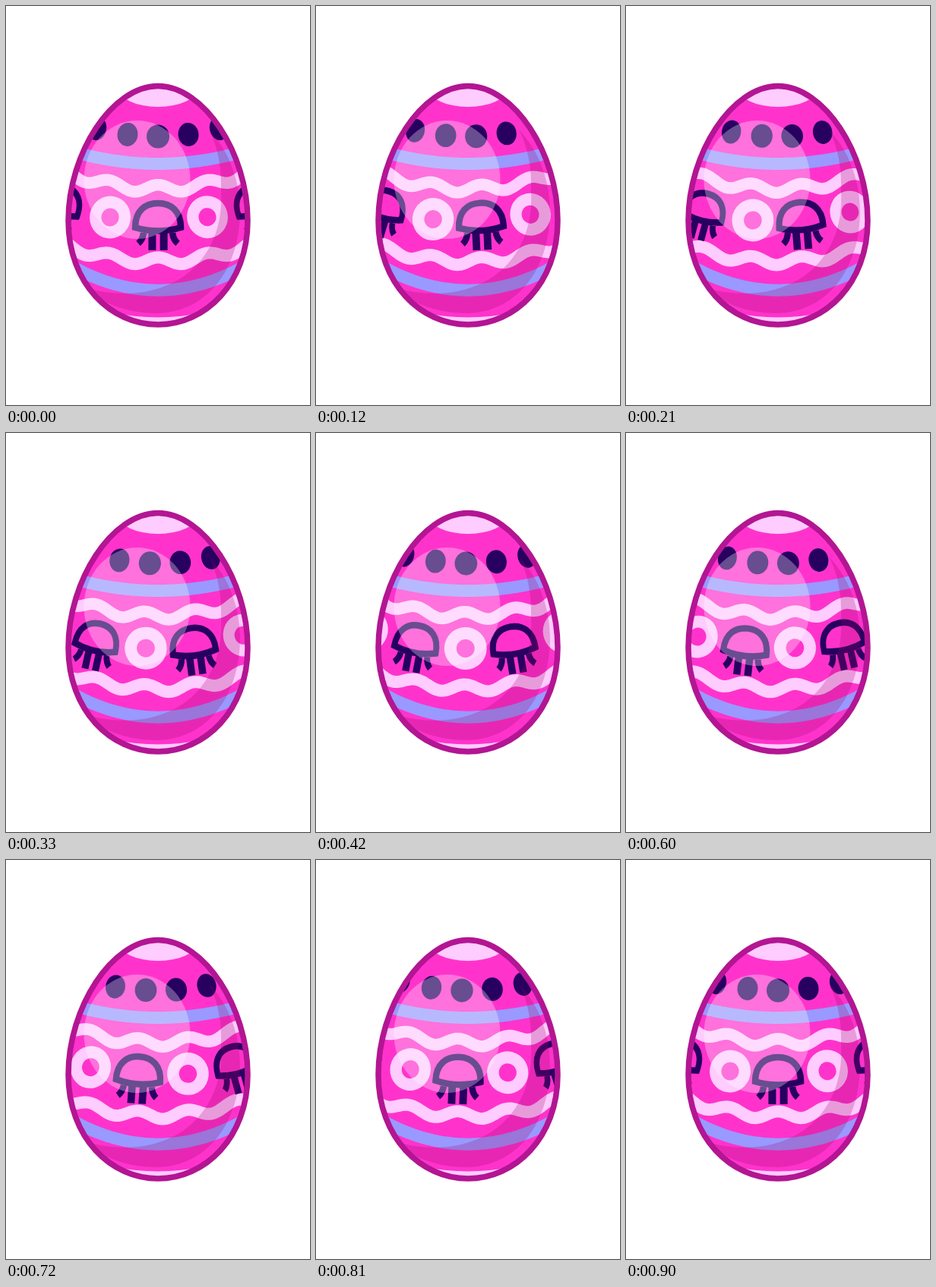
Animation, 400 px wide and 526 px high, one loop 930 ms. Source, as an HTML page with a canvas:

```html
<!DOCTYPE html>
<html lang="en">
<head>
<meta charset="utf-8">
<title>Turning egg</title>
<style>
html, body { margin: 0; width: 100%; height: 100%; overflow: hidden; background: #fff; }
canvas { display: block; width: 400px; height: 526px; }
</style>
</head>
<body>
<canvas id="stage" width="400" height="526"></canvas>
<script>
const ctx = document.getElementById('stage').getContext('2d');
const PINK = '#ff33cc', PALE = '#ffccff', BLUE = '#9999ff', NAVY = '#270060', RIM = '#b31593';
const CENTER = 200, STEP = 30, STEPS = 31, TILE = 128;

const egg = new Path2D(
  'M200 105.5 C260.5 105.5 318 194.5 318 283 C318 366 262 420 200 420 ' +
  'C138 420 82 366 82 283 C82 194.5 139.5 105.5 200 105.5Z');
const shade = new Path2D(
  'M267 163 C296 194 308 234 308 272 C307 348 264 404 199 405 C158 405 129 393 106 372 ' +
  'C212 400 288 340 283 245 C284 213 279 187 267 163Z');
const dome = new Path2D('M-30 8 C-30 -14 -17 -24 0 -24 S30 -14 30 8 Q0 17 -30 8Z');
const innerLashes = new Path2D('M-7.6 14 V38 M7.6 14 V38');
const outerLashes = new Path2D('M-19 15 Q-20 24 -26 29 M19 15 Q20 24 26 29');
const bottomCap = new Path2D('M140 404 Q200 417 260 404 V430 H140Z');

function fillEllipse(x, y, rx, ry, color) {
  ctx.fillStyle = color;
  ctx.beginPath();
  ctx.ellipse(x, y, rx, ry, 0, 0, 7);
  ctx.fill();
}

function fillPath(path, color) {
  ctx.fillStyle = color;
  ctx.fill(path);
}

function strokePath(path, width, color) {
  ctx.lineWidth = width;
  ctx.strokeStyle = color;
  ctx.stroke(path);
}

// A band sagging around the egg, optionally rippled.
function band(y, bend, width, color, ripple = 0, shift = 0) {
  const path = new Path2D();
  for (let x = 76; x <= 324; x += 2) {
    const d = x - CENTER;
    path.lineTo(x, y - bend * d * d - ripple * Math.cos((d - shift) * 4 * Math.PI / TILE));
  }
  strokePath(path, width, color);
}

// Places a motif on the curved surface, tilted and narrowed toward the sides.
function onSurface(d, y, bend, squeeze, motif) {
  ctx.save();
  ctx.translate(CENTER + d, y - bend * d * d);
  ctx.rotate(Math.atan(-2 * bend * d));
  ctx.scale(1 - squeeze * Math.abs(d), 1);
  motif();
  ctx.restore();
}

function eye() {
  strokePath(dome, 8.5, NAVY);
  strokePath(innerLashes, 10, NAVY);
  strokePath(outerLashes, 8.5, NAVY);
}

function ring() {
  fillEllipse(0, 0, 28, 28, PALE);
  fillEllipse(0, 0, 12, 12, PINK);
}

function dot() {
  fillEllipse(0, 0, 15, 15.5, NAVY);
}

function draw(turn) {
  const shift = turn * TILE;
  ctx.fillStyle = '#fff';
  ctx.fillRect(0, 0, 400, 526);

  ctx.save();
  ctx.clip(egg);
  fillPath(egg, PINK);
  fillEllipse(CENTER, 108, 52, 25, PALE);
  fillPath(bottomCap, PALE);

  band(208, 0.00128, 16, BLUE);
  band(374.7, 0.00245, 16, BLUE);
  band(241, 0.0015, 15.5, PALE, 5.3, shift);
  band(336.5, 0.00142, 16, PALE, 5, shift);

  for (let k = -4; k <= 2; k++) onSurface(k * 40 + turn * 80, 172, 0.0016, 0.0026, dot);
  for (let k = -2; k <= 1; k++) {
    onSurface(k * TILE + 65 + shift, 284, 0.00138, 0.0006, ring);
    onSurface(k * TILE + shift, 284, 0.00138, 0.0011, eye);
  }

  fillPath(shade, 'rgba(153,0,102,0.24)');
  fillEllipse(172.5, 229, 70, 78, 'rgba(255,255,255,0.3)');
  ctx.restore();

  strokePath(egg, 7.5, RIM);
}

const start = performance.now();
function loop() {
  const step = Math.floor((performance.now() - start) / STEP) % STEPS;
  draw(step / (STEPS - 1));
  requestAnimationFrame(loop);
}
loop();
</script>
</body>
</html>
```
